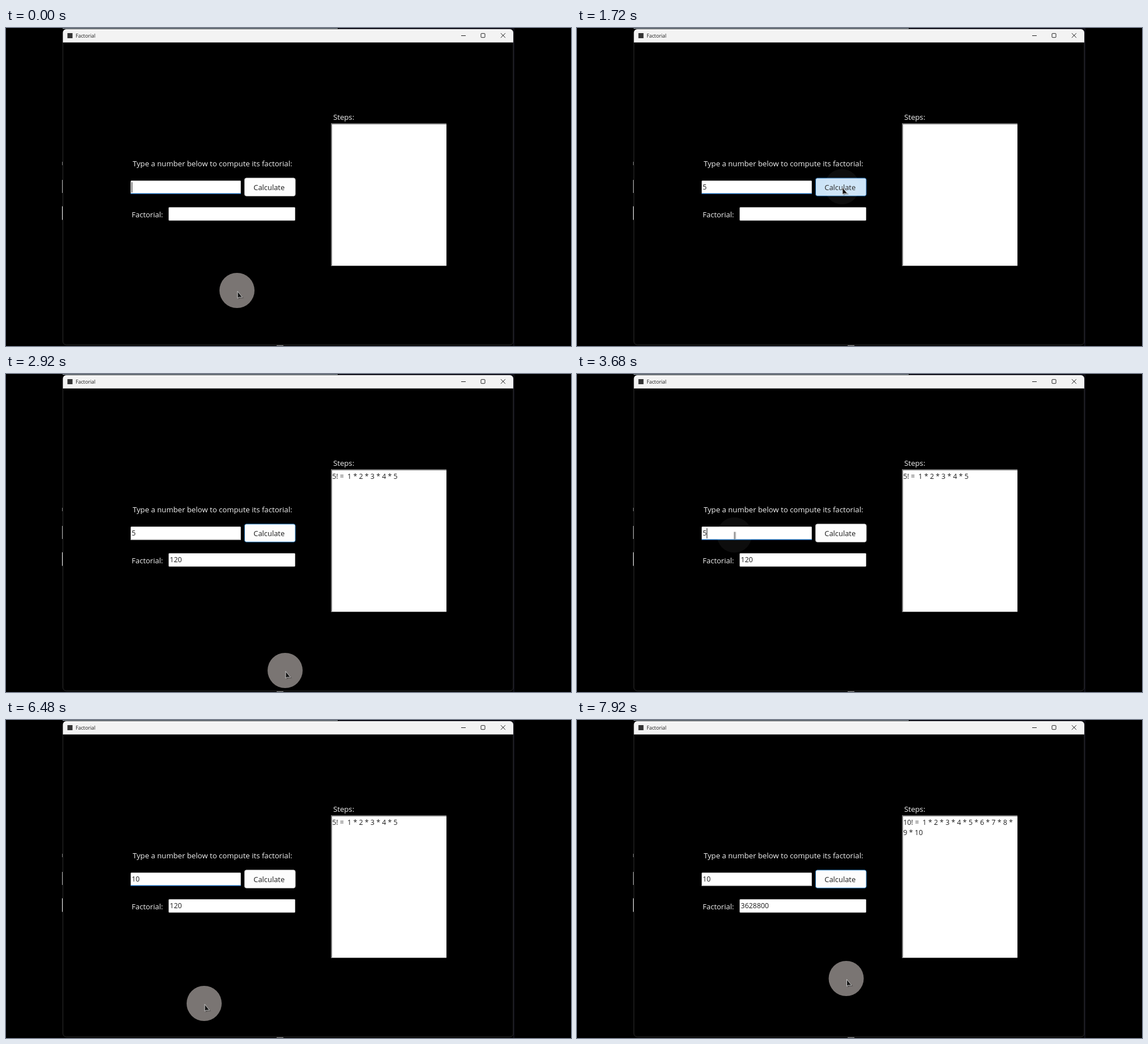
An HTML page for the animation above (8 s loop, 998 by 561 pixels).

```html
<!DOCTYPE html>
<html lang="en">
<head>
<meta charset="utf-8">
<title>Factorial</title>
<style>
  html, body { margin: 0; width: 100%; height: 100%; overflow: hidden; background: #000; }
  svg { display: block; width: 998px; height: 561px; }
  text { font: 12.4px "Open Sans", "Noto Sans", sans-serif; fill: #1c1c1c; white-space: pre; }
  .label { font-size: 13.2px; fill: #f2f2f2; }
  .sys { fill: none; stroke: #222; }
  .field { fill: #fff; stroke: #b4b4b4; }
</style>
</head>
<body>
<svg viewBox="0 0 998 561">
  <rect width="998" height="561"/>

  <!-- what shows behind the window -->
  <path d="M100 0H586V1.2H100Z" fill="#98a4ae"/>
  <path d="M588 0H898V561H896V2H588Z" fill="#12121c"/>
  <path d="M99 236h1.5v6h-1.5z" fill="#777"/>
  <path d="M99 268h1.5v23h-1.5z" fill="#aaa"/>
  <path d="M99 314.5h1.5v24h-1.5z" fill="#eee"/>
  <path d="M478 559.5h12v1.5h-12z" fill="#888"/>

  <!-- window -->
  <rect x="100.5" y="2.5" width="795.5" height="556.5" rx="6" fill="#000" stroke="#2e2e2e"/>
  <path d="M100.5 25.5V8a6 6 0 0 1 6-6H890a6 6 0 0 1 6 6V25.5Z" fill="#f3f3f3"/>
  <rect x="108.5" y="9" width="9" height="9" fill="#333"/>
  <text x="123" y="17" style="font-size:8.8px">Factorial</text>
  <path class="sys" d="M804 13.5h8M874 9.2l8 8M882 9.2l-8 8"/>
  <rect class="sys" x="839" y="9.7" width="7" height="7" rx="1"/>

  <text class="label" x="223.7" y="244">Type a number below to compute its factorial:</text>
  <text class="label" x="222" y="333.5" style="font-size:13px">Factorial:</text>
  <text class="label" x="578" y="162.3">Steps:</text>

  <rect class="field" x="220.5" y="269.5" width="194" height="23" rx="1"/>
  <rect id="line" x="220" y="291.5" width="195" height="1.5"/>
  <text id="input" x="222" y="285.3"></text>
  <rect id="caret" y="272" width="1" height="18" fill="#111"/>

  <rect id="button" x="421.5" y="264.8" width="89.5" height="31.5" rx="3"/>
  <text x="437.3" y="285.9" style="font-size:12.9px">Calculate</text>

  <rect class="field" x="287.5" y="316.5" width="223" height="23" rx="1"/>
  <text id="result" x="289.3" y="332.2"></text>

  <rect x="574" y="168" width="204" height="251.5" fill="#fff"/>
  <path d="M575 419.5V169H778" fill="none" stroke="#777" stroke-width="2"/>
  <text x="576.2" y="184.8"><tspan id="head"></tspan><tspan id="row1" dx="3"></tspan></text>
  <text id="row2" x="576.2" y="202.5"></text>

  <circle id="spot" r="31" fill="#fff5f0"/>
  <g id="arrow">
    <path d="M1.5 2V14L5 12.5 11 12Z" opacity=".3"/>
    <path d="M0 0V12L3 10.5H8.5Z" fill="#141414" stroke="#d8d8d8" stroke-width=".9"/>
  </g>
  <g id="beam">
    <path d="M-1 -7V6" stroke="#555" stroke-width="1.2"/>
    <path d="M1 -7V6" stroke="#aaa" stroke-width="1.5"/>
  </g>
</svg>
<script>
const LOOP = 8000, TICK = 40, DIGIT = 7.1;
const el = id => document.getElementById(id);
const set = (id, attrs) => {
  for (const name in attrs) el(id).setAttribute(name, attrs[name]);
};
const clamp = v => Math.min(1, Math.max(0, v));
const ease = k => k * k * (3 - 2 * k);

const origin = { x: 408, y: 463 };
const moves = [
  { at: 1200, ms: 360, x: 468, y: 280 },
  { at: 1800, ms: 160, x: 486, y: 444 },
  { at: 2120, ms: 800, x: 493, y: 523, bow: 35 },
  { at: 3000, ms: 520, x: 278, y: 284 },
  { at: 3720, ms: 200, x: 347, y: 505 },
  { at: 6440, ms: 40, x: 350, y: 500 },
  { at: 6760, ms: 600, x: 445.5, y: 279 },
  { at: 7600, ms: 320, x: 475.5, y: 456 }
];
const clicks = [
  { at: 1720, on: "button" },
  { at: 3680, on: "box" },
  { at: 7520, on: "button" }
];
// caret: how long it stays lit after the edit
const edits = [
  { at: 0, text: "", caret: 520 },
  { at: 520, text: "5", caret: 80 },
  { at: 4800, text: "", caret: 200 },
  { at: 5800, text: "10", caret: 160 }
];
const PRESS = 80, FOCUS_CARET = 720;

const latest = (list, t) => list.filter(e => e.at <= t).pop();

function spotAt(t) {
  let { x, y } = origin;
  for (const m of moves) {
    const k = ease(clamp((t - m.at) / m.ms));
    x += (m.x - x) * k + (m.bow || 0) * Math.sin(Math.PI * k);
    y += (m.y - y) * k;
  }
  return { x, y };
}

// The spot fades out around each click
function glow(t) {
  const gap = Math.min(...clicks.map(c => Math.abs(t - c.at)));
  return .05 + .43 * ease(clamp((gap - 20) / 100));
}

function working(n) {
  if (!n) return ["", "", "", ""];
  const list = Array.from({ length: n }, (_, i) => i + 1);
  const more = list.slice(8);
  return [`${n}! = `, list.slice(0, 8).join(" * ") + (more.length ? " *" : ""),
    more.join(" * "), list.reduce((a, b) => a * b)];
}

function draw(t) {
  const { x, y } = spotAt(t), px = x + 1, py = y + 1.5;
  const over = (l, top, r, b) => px >= l && px <= r && py >= top && py <= b;
  const edit = latest(edits, t), click = latest(clicks, t);
  const move = latest(moves, t), submit = latest(clicks.filter(c => c.on === "button"), t - PRESS / 2);

  const boxFocus = !click || click.on === "box" || t < click.at + PRESS;
  const lit = t < edit.at + edit.caret ||
    click?.on === "box" && t >= click.at && t < click.at + FOCUS_CARET;
  el("input").textContent = edit.text;
  set("caret", { x: 222 + DIGIT * edit.text.length, opacity: lit ? 1 : 0 });
  set("line", { fill: boxFocus ? "#1667b0" : "#b4b4b4" });

  const answer = submit ? +latest(edits, submit.at).text : 0;
  ["head", "row1", "row2", "result"].forEach((id, i) => el(id).textContent = working(answer)[i]);

  const hover = over(421, 264, 511, 296);
  const down = clicks.some(c => c.on === "button" && Math.abs(t - c.at) < PRESS);
  set("button", {
    fill: down ? "#cce4f7" : hover ? "#e3f0fb" : "#fdfdfd",
    stroke: down ? "#1a5f9e" : hover || !boxFocus ? "#2a7fc4" : "#d0d0d0"
  });

  // Typing hides the pointer until the mouse moves again
  const shown = edit.at === 0 || move && move.at > edit.at;
  const text = over(220, 269, 415, 293) || over(287, 316, 511, 340);
  const transform = `translate(${px} ${py})`;
  set("spot", { cx: x, cy: y, opacity: glow(t) });
  set("arrow", { transform, opacity: shown && !text ? 1 : 0 });
  set("beam", { transform, opacity: shown && text ? 1 : 0 });
}

const start = performance.now();
function frame() {
  const t = (performance.now() - start) % LOOP;
  draw(Math.floor(t / TICK) * TICK);
  requestAnimationFrame(frame);
}
frame();
</script>
</body>
</html>
```
